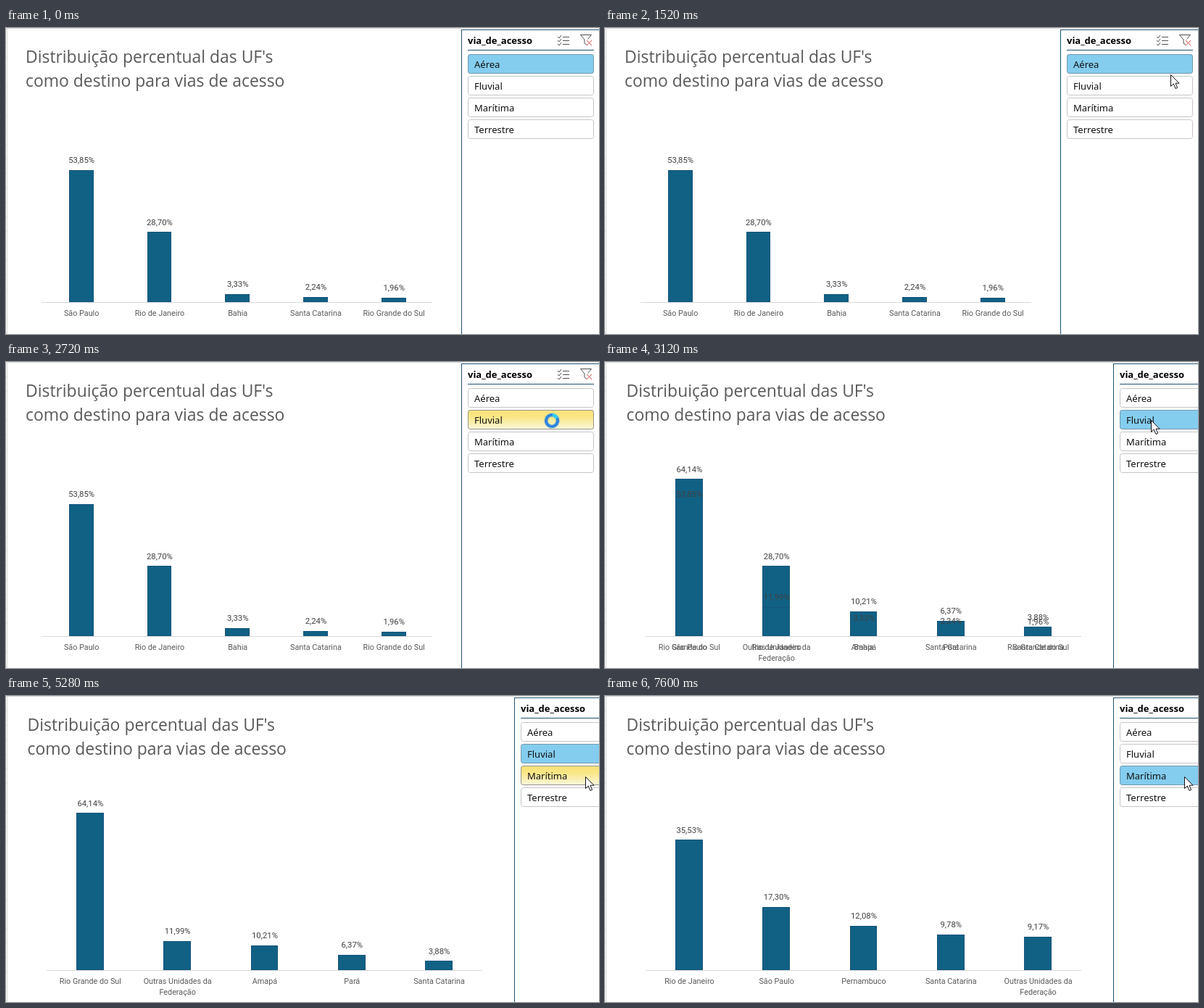
Write an HTML page that moves like this. It is 818 px wide and 422 px high and loops after 8 s.

```html
<!DOCTYPE html>
<html lang="pt">
<head>
<meta charset="utf-8">
<title>Vias de acesso</title>
<style>
  html, body { margin: 0; width: 100%; height: 100%; overflow: hidden; background: #fff; }
  svg { display: block; width: 818px; height: 422px; }
  text { fill: #595959; font-family: Roboto, Arial, sans-serif; }
  .title text { font: 22.9px "Open Sans", "Noto Sans", sans-serif; }
  .cat { font-size: 10.8px; text-anchor: middle; }
  .pct { font-size: 11.3px; text-anchor: middle; fill: #404040; }
  .bar { fill: #116185; stroke: #14547b; }
  .axis, .sheet { stroke: #d9d9d9; fill: none; }
  .slicer text { font: 13px "Noto Sans", sans-serif; fill: #111; }
  .slicer .head { font-weight: 700; fill: #000; }
  .frame { stroke: #1f5273; fill: none; }
  .btn { fill: #fff; stroke: #c6c4c8; }
  .picked { fill: #84cdef; stroke: #7597a9; }
  .hover { fill: url(#glow); stroke: #96938a; }
  .icon { fill: none; stroke: #505050; }

  .title, .slicer, .wide, .narrow, .fade, .picked, .hover, .arrow, .busy, .pointer {
    animation: 8s step-end infinite;
  }
  .title { animation-name: nudge; }
  .slicer { animation-name: push; }
  .narrow { animation-name: narrow; }
  .wide { animation-name: wide; }
  .air { animation-name: air; animation-timing-function: linear; }
  .river { animation-name: river; animation-timing-function: linear; }
  .sea { animation-name: sea; animation-timing-function: linear; }
  .pick0 { animation-name: pick0; }
  .pick1 { animation-name: pick1; }
  .pick2 { animation-name: pick2; }
  .hover1 { animation-name: hover1; }
  .hover2 { animation-name: hover2; }
  .pointer { animation-name: move; animation-timing-function: linear; }
  .arrow { animation-name: arrow; }
  .busy { animation-name: busy; }
  .spin { animation: spin 1s linear infinite; }

  @keyframes nudge { 0% { transform: none } 36%, 100% { transform: translate(2.5px, 0) } }
  @keyframes push { 0% { transform: none } 36%, 100% { transform: translate(73px, 0) } }
  @keyframes narrow { 0% { opacity: 1 } 36%, 100% { opacity: 0 } }
  @keyframes wide { 0% { opacity: 0 } 36%, 100% { opacity: 1 } }
  @keyframes air { 0%, 40% { opacity: 1 } 42%, 100% { opacity: 0 } }
  @keyframes river { 0%, 36.5% { opacity: 0 } 38.5%, 93% { opacity: 1 } 94.8%, 100% { opacity: 0 } }
  @keyframes sea { 0%, 91% { opacity: 0 } 92.8%, 100% { opacity: 1 } }
  @keyframes pick0 { 0% { opacity: 1 } 29%, 100% { opacity: 0 } }
  @keyframes pick1 { 0% { opacity: 0 } 36% { opacity: 1 } 91%, 100% { opacity: 0 } }
  @keyframes pick2 { 0% { opacity: 0 } 91%, 100% { opacity: 1 } }
  @keyframes hover1 { 0% { opacity: 0 } 22% { opacity: 1 } 36%, 100% { opacity: 0 } }
  @keyframes hover2 { 0% { opacity: 0 } 48% { opacity: 1 } 91%, 100% { opacity: 0 } }
  @keyframes arrow { 0% { opacity: 1 } 29% { opacity: 0 } 36%, 100% { opacity: 1 } }
  @keyframes busy { 0% { opacity: 0 } 29% { opacity: 1 } 36%, 100% { opacity: 0 } }
  @keyframes spin { to { transform: rotate(360deg) } }
  @keyframes move {
    0%, 13% { transform: translate(830px, 60px) }
    17%, 21.5% { transform: translate(780px, 64px) }
    24%, 44% { transform: translate(753px, 80px) }
    45% { transform: translate(786px, 88px) }
    48%, 50% { transform: translate(808px, 106px) }
    51%, 62.9% { transform: translate(811px, 109px) }
    66%, 100% { transform: translate(799px, 111px) }
  }
</style>
</head>
<body>
<svg viewBox="0 0 818 422" xmlns="http://www.w3.org/2000/svg">
  <defs>
    <linearGradient id="glow" x1="0" y1="0" x2="0" y2="1">
      <stop offset="0" stop-color="#f9e27a"/>
      <stop offset=".35" stop-color="#f9e684"/>
      <stop offset="1" stop-color="#fbf8dc"/>
    </linearGradient>
  </defs>
  <g class="sheet">
    <path d="M0 .5H818M1.5 0V422"/>
    <path d="M.5 20V422" stroke-dasharray="1 19"/>
  </g>
  <g class="title">
    <text x="27" y="48">Distribuição percentual das UF's</text>
    <text x="27" y="81">como destino para vias de acesso</text>
  </g>
  <g id="bars"></g>
  <g id="labels"></g>
  <g class="slicer">
    <rect class="frame" x="628.5" y="2.5" width="265" height="440" style="fill:#fff"/>
    <path class="frame" d="M637 30.5H811"/>
    <text class="head" x="637" y="22">via_de_acesso</text>
    <path class="icon" d="M761 12l2 2 3-4M761 17l2 2 3-4M761 22l2 2 3-4M768 12.5h9M768 17.5h9M768 22.5h9"/>
    <path class="icon" d="M802 24l-4-3v-5l-5.500-6.500h15l-5 6"/>
    <path class="icon" d="M801 17l7 7m0-7l-7 7" style="stroke:#d0453f"/>
    <g id="buttons"></g>
  </g>
  <g class="pointer">
    <path class="arrow" d="M.5 .5V16.500L4.300 13 7 19.500 9.600 18.400 7 12.200H12Z" fill="#fff" stroke="#111"/>
    <g class="busy" transform="translate(0 1)">
      <g class="spin" fill="none" stroke-width="4.500">
        <circle r="8" stroke="#2d84dc"/>
        <path d="M7.700 2.100A8 8 0 0 1 2.100 7.700" stroke="#35cdf2"/>
      </g>
    </g>
  </g>
</svg>
<script>
  const NS = 'http://www.w3.org/2000/svg';
  const BASE = 378;
  const NARROW = { start: 104.15, pitch: 107.75, width: 33.75, axis: 'M49 378.5H588' };
  const WIDE = { start: 116.375, pitch: 120.3, width: 37.55, axis: 'M56 378.5H657' };
  const OTHERS = 'Outras Unidades da|Federação';

  const AIR = [['São Paulo', 53.85], ['Rio de Janeiro', 28.7], ['Bahia', 3.33],
    ['Santa Catarina', 2.24], ['Rio Grande do Sul', 1.96]];
  const RIVER = [['Rio Grande do Sul', 64.14], [OTHERS, 11.99], ['Amapá', 10.21],
    ['Pará', 6.37], ['Santa Catarina', 3.88]];
  const SEA = [['Rio de Janeiro', 35.53], ['São Paulo', 17.3], ['Pernambuco', 12.08],
    ['Santa Catarina', 9.78], [OTHERS, 9.17]];

  function add(parent, tag, attrs, text) {
    const el = document.createElementNS(NS, tag);
    for (const key in attrs) el.setAttribute(key, attrs[key]);
    if (text) el.textContent = text;
    return parent.appendChild(el);
  }

  const barLayer = document.getElementById('bars');
  const labelLayer = document.getElementById('labels');
  const buttons = document.getElementById('buttons');

  // Bars and labels live in separate layers so labels stay on top in a cross-fade.
  function chart(rows, layout, scale, cls, barParent = barLayer, labelParent = labelLayer) {
    const bars = add(barParent, 'g', { class: cls });
    const labels = add(labelParent, 'g', { class: cls });
    rows.forEach(([name, value], i) => {
      const x = layout.start + layout.pitch * i;
      const left = Math.floor(x - layout.width / 2);
      const right = Math.floor(x + layout.width / 2);
      const height = value * scale;
      const top = BASE - Math.floor(height);
      add(bars, 'rect', {
        class: 'bar', x: left + 0.5, y: top + 0.5,
        width: right - left - 1, height: BASE - top - 1
      });
      add(labels, 'text', { class: 'pct', x, y: Math.round(BASE - height - 9.3) },
        value.toFixed(2).replace('.', ',') + '%');
      name.split('|').forEach((line, n) =>
        add(labels, 'text', { class: 'cat', x, y: 397 + 15 * n }, line));
    });
  }

  chart(AIR, NARROW, 3.385, 'narrow');
  chart(AIR, WIDE, 3.385, 'fade air',
    add(barLayer, 'g', { class: 'wide' }), add(labelLayer, 'g', { class: 'wide' }));
  chart(RIVER, WIDE, 3.385, 'fade river');
  chart(SEA, WIDE, 5.07, 'fade sea');
  add(barLayer, 'path', { class: 'axis narrow', d: NARROW.axis });
  add(barLayer, 'path', { class: 'axis wide', d: WIDE.axis });

  ['Aérea', 'Fluvial', 'Marítima', 'Terrestre'].forEach((name, i) => {
    const y = 36.5 + 30 * i;
    const box = cls => add(buttons, 'rect', { class: cls, x: 637.5, y, width: 173, height: 26, rx: 3 });
    box('btn');
    if (i < 3) box('picked pick' + i);
    if (i === 1 || i === 2) box('hover hover' + i);
    add(buttons, 'text', { x: 646, y: y + 18.5 }, name);
  });
</script>
</body>
</html>
```
